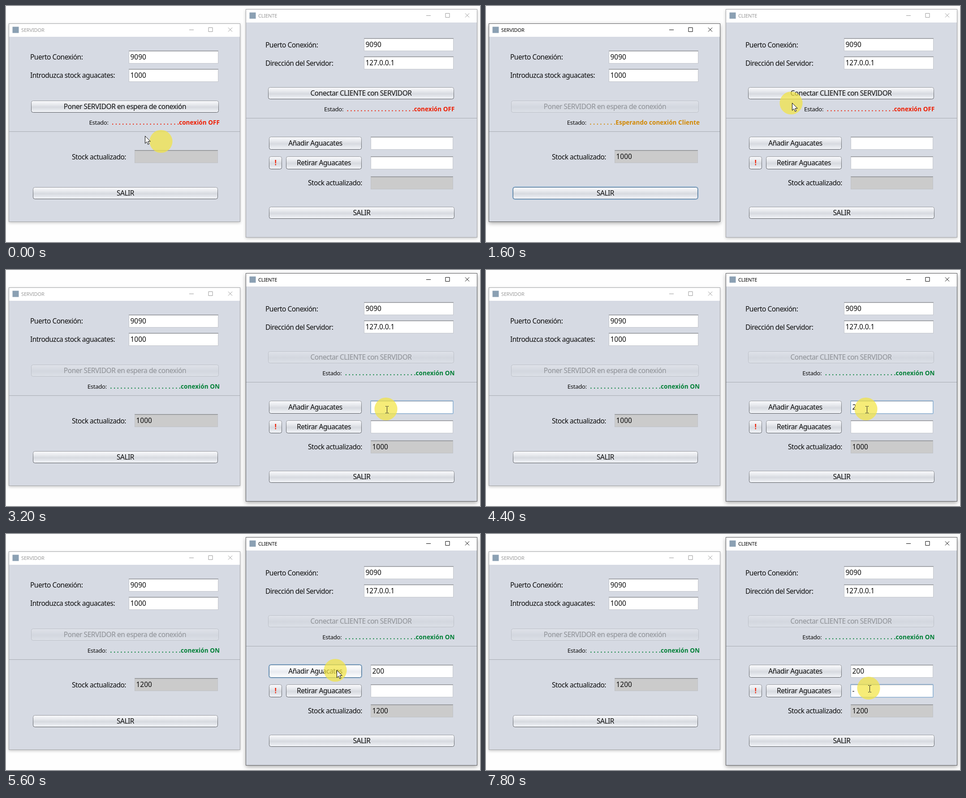
These frames come from a looping animation (1058x529 px, 8000 ms). An HTML page:

```html
<!DOCTYPE html>
<html lang="es">
<head>
<meta charset="utf-8">
<title>Servidor y cliente</title>
<style>
  html, body { margin: 0; width: 100%; height: 100%; overflow: hidden; background: #fefefe; }
  svg { display: block; width: 1058px; height: 529px; }
  text { font: 15.5px "Noto Sans", "Open Sans", sans-serif; letter-spacing: -.52px; white-space: pre; fill: #0c0c0c; }
  .title { font-size: 11px; letter-spacing: -.15px; fill: #999; }
  .frame { fill: #d6dae3; stroke: #a3a4a7; filter: drop-shadow(0 2px 3px rgba(0,0,0,.22)); }
  .ctl { fill: none; stroke: #999; }
  .active .title { fill: #000; }
  .active .frame { stroke: #5c5d60; filter: drop-shadow(0 3px 5px rgba(0,0,0,.34)); }
  .active .ctl { stroke: #000; }
  .split { stroke: #a6aab2; }

  .ring { fill: none; stroke: #8db3d6; stroke-width: 1.6; visibility: hidden; }
  .focus .ring { visibility: visible; }
  .face { fill: url(#face); stroke: url(#edge); }
  .hover .face { fill: url(#lit); }
  .focus .face { stroke: #4d6c88; }
  .off .face { fill: url(#dim); stroke: #bcc0c8; }
  .off text { fill: #8e9196; }
  .button text { text-anchor: middle; letter-spacing: -.46px; }
  .button .alert { font-weight: 700; fill: #ee1c00; }

  .box { fill: #fff; stroke: #c3c6cc; }
  .lock .box { fill: #cbcbcb; stroke: #c0c2c6; }
  .field text { letter-spacing: -.1px; }

  .status { font-size: 13.2px; letter-spacing: -.33px; text-anchor: end; }
  .dots, .word { font-size: 13.5px; font-weight: 700; letter-spacing: .16px; }
  .word { letter-spacing: .06px; }
</style>
</head>
<body>
<svg id="stage" viewBox="0 0 1058 529">
  <defs>
    <linearGradient id="face" x2="0" y2="1">
      <stop offset="0" stop-color="#fafafc"/><stop offset=".3" stop-color="#e9ebef"/>
      <stop offset=".55" stop-color="#d7dae0"/><stop offset="1" stop-color="#f3f5f9"/>
    </linearGradient>
    <linearGradient id="lit" x2="0" y2="1">
      <stop offset="0" stop-color="#fff"/><stop offset=".3" stop-color="#f6f7fa"/>
      <stop offset=".55" stop-color="#e9ebf0"/><stop offset="1" stop-color="#fff"/>
    </linearGradient>
    <linearGradient id="dim" x2="0" y2="1">
      <stop offset="0" stop-color="#dfe2e9"/><stop offset=".55" stop-color="#d3d7df"/>
      <stop offset="1" stop-color="#dce0e7"/>
    </linearGradient>
    <linearGradient id="edge" x2="0" y2="1">
      <stop offset="0" stop-color="#95989e"/><stop offset="1" stop-color="#53565c"/>
    </linearGradient>
  </defs>
</svg>
<script>
const LOOP = 8000, STEP = 200;
const RED = '#ee1c00', AMBER = '#d18700', GREEN = '#007f36';
const stage = document.getElementById('stage');

function add(parent, tag, attrs, text) {
  const el = document.createElementNS('http://www.w3.org/2000/svg', tag);
  for (const k in attrs) el.setAttribute(k, attrs[k]);
  if (text) el.textContent = text;
  parent.append(el);
  return el;
}

function rect(parent, cls, x, y, width, height, rx = 0) {
  return add(parent, 'rect', { class: cls, x, y, width, height, rx });
}

function label(parent, x, y, text) {
  add(parent, 'text', { x, y }, text);
}

function makeWindow(x, y, h, split, name) {
  const g = add(stage, 'g');
  rect(g, 'frame', x + .5, y + .5, 516, h);
  add(g, 'rect', { x: x + 1, y: y + 1, width: 515, height: 29, fill: '#fff' });
  add(g, 'rect', { x: x + 8.5, y: y + 7.5, width: 14, height: 14, fill: '#8ba0b3' });
  add(g, 'text', { class: 'title', x: x + 28, y: y + 18.7 }, name);
  add(g, 'path', {
    class: 'ctl',
    d: `M${x + 403} ${y + 14.5}h10m33-5h9v9h-9zm44 0l9 9m0-9l-9 9`
  });
  add(g, 'path', { class: 'split', d: `M${x + 1} ${split + .5}h515` });
  return g;
}

function button(parent, x, y, w, h, text, cls = '') {
  const g = add(parent, 'g', { class: 'button' });
  rect(g, 'ring', x - .4, y - .4, w + .8, h + .8, 5);
  rect(g, 'face', x + .5, y + .5, w - 1, h - 1, 4);
  add(g, 'text', { class: cls, x: x + w / 2, y: y + h / 2 + 5.5 }, text);
  g.area = [x, y, w, h];
  return g;
}

function field(parent, x, y, w, value = '', locked = false) {
  const g = add(parent, 'g', { class: 'field' + (locked ? ' lock' : '') });
  rect(g, 'box', x + .5, y + .5, w - 1, 28);
  add(g, 'path', { d: `M${x} ${y + .5}h${w}`, stroke: '#8d8f93' });
  add(g, 'path', { d: `M${x + 1} ${y + 1.5}h${w - 2}`, stroke: locked ? '#a9aaac' : '#bfc1c5' });
  rect(g, 'ring', x, y, w, 29, 1);
  g.text = add(g, 'text', { x: x + 3.6, y: y + 20 }, value);
  g.area = [x, y, w, 29];
  return g;
}

function status(parent, x, y) {
  const el = add(parent, 'text', { class: 'status', x, y });
  add(el, 'tspan', {}, 'Estado: ');
  const dots = add(el, 'tspan', { class: 'dots', dx: 4.5 });
  const word = add(el, 'tspan', { class: 'word' });
  return (count, text, color) => {
    dots.textContent = '. '.repeat(count).trim();
    word.textContent = text;
    dots.style.fill = word.style.fill = color;
  };
}

const server = makeWindow(6, 39, 444, 281, 'SERVIDOR');
label(server, 54, 120, 'Puerto Conexión:');
label(server, 54, 161, 'Introduzca stock aguacates:');
label(server, 147, 343.5, 'Stock actualizado:');
field(server, 274, 100, 200, '9090');
field(server, 274, 141, 200, '1000');
const serverStock = field(server, 287, 323, 186, '', true);
const wait = button(server, 56, 212, 419, 27, 'Poner SERVIDOR en espera de conexión');
const serverExit = button(server, 60, 406, 413, 27, 'SALIR');
const serverStatus = status(server, 477, 265.5);

const client = makeWindow(535, 7, 511, 251, 'CLIENTE');
label(client, 579, 92.5, 'Puerto Conexión:');
label(client, 579, 133.5, 'Dirección del Servidor:');
label(client, 674, 402, 'Stock actualizado:');
field(client, 799, 72, 200, '9090');
field(client, 799, 113, 200, '127.0.0.1');
const addField = field(client, 814, 293, 184);
const takeField = field(client, 814, 337, 184);
const clientStock = field(client, 814, 382, 184, '', true);
const connect = button(client, 585, 182, 415, 27, 'Conectar CLIENTE con SERVIDOR');
const addButton = button(client, 587, 293, 207, 29, 'Añadir Aguacates');
const takeButton = button(client, 625, 337, 169, 29, 'Retirar Aguacates');
button(client, 587, 337, 29, 29, '!', 'alert');
button(client, 587, 450, 414, 27, 'SALIR');
const clientStatus = status(client, 1001.5, 235.5);

const halo = add(stage, 'circle', { fill: '#f3e545', opacity: .72 });
const arrow = add(stage, 'path', {
  d: 'M.5 .5v16.5l3.8-3.6 2.6 6 2.7-1.2-2.6-5.8h5.2z', fill: '#fff', stroke: '#000'
});
const beam = add(stage, 'path', {
  d: 'M-3.5-7.5h2.5l1 1 1-1h2.5M0-6.5v13M-3.5 7.5h2.5l1-1 1 1h2.5', fill: 'none', stroke: '#222'
});

// Pointer path: time, x, y
const path = [
  [-60, 348, 305], [0, 310, 291], [400, 312, 262], [800, 304, 250], [940, 301, 244],
  [1000, 295, 236], [1200, 295, 236], [1540, 683, 219], [1600, 683, 217], [1800, 692, 200],
  [2000, 692, 200], [2200, 745, 238], [2340, 790, 271], [2400, 797, 277], [2600, 822, 298],
  [3000, 850, 313], [4800, 850, 313], [5000, 815, 310], [5200, 760, 306], [5400, 738, 305],
  [5540, 737, 307], [5600, 738, 305], [5800, 738, 305], [6200, 790, 325], [6600, 856, 347],
  [LOOP, 856, 347]
];
const clicks = [1000, 1800, 3000, 5400, 6800];

function pointer(t) {
  const i = Math.max(1, path.findIndex(p => p[0] >= t));
  const [t0, x0, y0] = path[i - 1], [t1, x1, y1] = path[i];
  const k = (t - t0) / (t1 - t0);
  return [x0 + (x1 - x0) * k, y0 + (y1 - y0) * k];
}

const inside = ([px, py], [x, y, w, h]) => px >= x && px < x + w && py >= y && py < y + h;
const between = (t, a, b) => t >= a && t < b;
const flag = (el, cls, on) => el.classList.toggle(cls, on);

function draw(t) {
  const pos = pointer(t), [hx, hy] = pointer(t - 60);

  flag(server, 'active', between(t, 1000, 1800));
  flag(client, 'active', t >= 1800);
  flag(wait, 'off', t >= 1200);
  flag(connect, 'off', t >= 2000);
  flag(serverExit, 'focus', between(t, 1200, 1800));
  flag(addButton, 'focus', between(t, 2000, 3000) || between(t, 5400, 6800));
  flag(addField, 'focus', between(t, 3000, 5400));
  flag(takeField, 'focus', t >= 6800);
  for (const b of [wait, connect, addButton, takeButton]) flag(b, 'hover', inside(pos, b.area));

  if (t < 1200) serverStatus(20, 'conexión OFF', RED);
  else if (t < 2000) serverStatus(8, 'Esperando conexión Cliente', AMBER);
  else serverStatus(21, 'conexión ON', GREEN);
  if (t < 2000) clientStatus(20, 'conexión OFF', RED);
  else clientStatus(21, 'conexión ON', GREEN);

  const stock = t < 5600 ? '1000' : '1200';
  serverStock.text.textContent = t < 1200 ? '' : stock;
  clientStock.text.textContent = t < 2000 ? '' : stock;
  addField.text.textContent = '200'.slice(0, Math.max(0, (t - 4200) / STEP));
  takeField.text.textContent = t >= 7800 ? '-' : '';

  const typing = inside(pos, addField.area) || inside(pos, takeField.area);
  const [x, y] = pos.map(Math.round);
  arrow.setAttribute('visibility', typing ? 'hidden' : 'visible');
  beam.setAttribute('visibility', typing ? 'visible' : 'hidden');
  arrow.setAttribute('transform', `translate(${x} ${y})`);
  beam.setAttribute('transform', `translate(${x + .5} ${y})`);
  halo.setAttribute('cx', hx - 2);
  halo.setAttribute('cy', hy - 1.5);
  halo.setAttribute('r', clicks.includes(t) ? 14 : 25.6);
}

const start = performance.now();
let shown = -1;
function tick() {
  const t = Math.floor((performance.now() - start) % LOOP / STEP) * STEP;
  if (t !== shown) draw(shown = t);
  requestAnimationFrame(tick);
}
tick();
</script>
</body>
</html>
```
